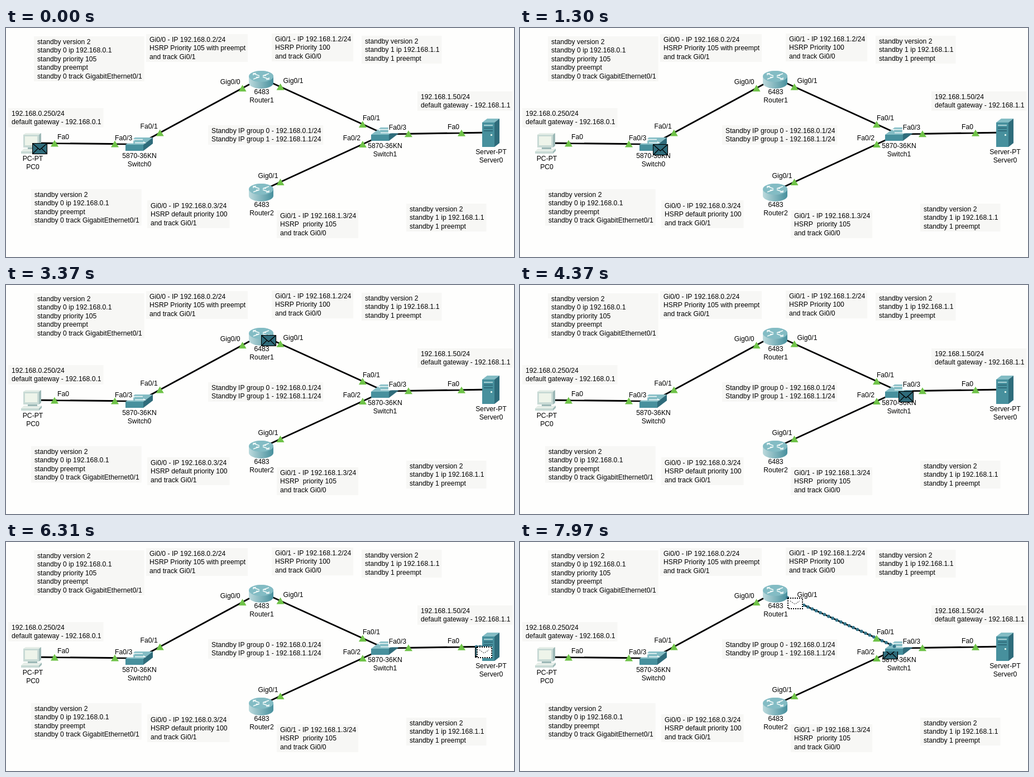
Write an HTML page with a canvas that moves like this. It is 910x412 px and loops after 8000 ms.

```html
<!DOCTYPE html>
<html lang="en">
<head>
<meta charset="utf-8">
<title>Packet simulation</title>
<style>
  html, body { margin: 0; width: 100%; height: 100%; overflow: hidden; background: #fefefd; }
  canvas { display: block; }
</style>
</head>
<body>
<canvas id="stage" width="910" height="412"></canvas>
<script>
const ctx = document.getElementById('stage').getContext('2d');
const LOOP = 8000, FIRST_HOP = 585, HOP_PERIOD = 1419, FLIGHT = 315, STEPS = 30;
const LINE_HEIGHT = 15.4;
const PAPER = '#fefefd', NOTE = '#f7f7f5', DARK = '#2f6c7b', TEAL = '#47909d', LIGHT = '#83bcc4';

// reach: distance from the centre to a link light; drop: distance down to the caption.
const kinds = {
  pc: { draw: drawPc, reach: 40, drop: 28, model: 'PC-PT' },
  switch: { draw: drawSwitch, reach: 43, drop: 21, model: '5870-36KN' },
  router: { draw: drawRouter, reach: 38, drop: 25, model: '6483' },
  server: { draw: drawServer, reach: 52, drop: 35, model: 'Server-PT' }
};
const device = (kind, name, x, y) => ({ ...kinds[kind], name, x, y });
const pc = device('pc', 'PC0', 47, 207);
const switch0 = device('switch', 'Switch0', 238, 209);
const router1 = device('router', 'Router1', 457, 90);
const router2 = device('router', 'Router2', 457, 293);
const switch1 = device('switch', 'Switch1', 678, 191);
const server = device('server', 'Server0', 868, 188);
const devices = [pc, switch0, router1, router2, switch1, server];
const route = [pc, switch0, router1, switch1, server, switch1, router1];

// Port names stand to the left or right of their link lights.
const links = [
  { from: pc, to: switch0, ports: ['Fa0', 'Fa0/3'], side: 'right' },
  { from: switch0, to: router1, ports: ['Fa0/1', 'Gig0/0'], side: 'left' },
  { from: router1, to: switch1, ports: ['Gig0/1', 'Fa0/1'], side: 'right' },
  { from: switch1, to: server, ports: ['Fa0/3', 'Fa0'], side: 'left' },
  { from: router2, to: switch1, ports: ['Gig0/1', 'Fa0/2'], side: 'left' }
];

const standby = (group, ...rest) =>
  ['version 2', `${group} ip 192.168.${group}.1`, ...rest].map(line => 'standby ' + line);
const port = (net, host, priority) =>
  [`Gi0/${net} - IP 192.168.${net}.${host}/24`, 'HSRP ' + priority, `and track Gi0/${1 - net}`];
const host = (net, number) =>
  [`192.168.${net}.${number}/24`, `default gateway - 192.168.${net}.1`];
const trackPort = '0 track GigabitEthernet0/1';
const notes = [
  [56, 25, standby(0, 'priority 105', 'preempt', trackPort)],
  [257, 21, port(0, 2, 'Priority 105 with preempt')],
  [482, 20, port(1, 2, 'Priority 100')],
  [643, 24, standby(1, '1 preempt')],
  [10, 154, host(0, 250)],
  [743, 124, host(1, 50)],
  [368, 185, [0, 1].map(group => `Standby IP group ${group} - 192.168.${group}.1/24`)],
  [51, 300, standby(0, 'preempt', trackPort)],
  [259, 320, port(0, 3, 'default priority 100')],
  [491, 338, port(1, 3, ' priority 105')],
  [723, 326, standby(1, '1 preempt')]
];

const along = (a, b, share) => [a.x + (b.x - a.x) * share, a.y + (b.y - a.y) * share];

function rect(fill, x, y, w, h) {
  ctx.fillStyle = fill;
  ctx.fillRect(x, y, w, h);
}

function poly(fill, ...points) {
  ctx.beginPath();
  points.forEach(([x, y]) => ctx.lineTo(x, y));
  ctx.fillStyle = fill;
  ctx.fill();
}

function stroke(color, width, ...points) {
  ctx.beginPath();
  points.forEach(([x, y]) => ctx.lineTo(x, y));
  ctx.strokeStyle = color;
  ctx.lineWidth = width;
  ctx.stroke();
}

function text(string, x, y, align = 'left') {
  ctx.textAlign = align;
  ctx.fillStyle = '#000';
  ctx.fillText(string, x, Math.round(y) + 4);
}

// A box seen from the front, with its top and right faces leaning back.
function box(x, y, w, h, leanX, leanY, [front, top, side]) {
  const right = x + w;
  poly(top, [x, y], [x + leanX, y - leanY], [right + leanX, y - leanY], [right, y]);
  poly(side, [right, y], [right + leanX, y - leanY], [right + leanX, y + h - leanY], [right, y + h]);
  rect(front, x, y, w, h);
}

function drawPc() {
  const shades = ['#c8dad5', '#e6eee8', '#9cb8b6'];
  box(-20, 15, 32, 4, 5, 5, shades);
  rect(shades[2], -8, 8, 17, 3);
  box(-16, -15, 28, 23, 4, 3, shades);
  rect('#eef4ea', -13, -12, 22, 16);
}

function drawSwitch() {
  box(-24, 1, 32, 11, 17, 13, [TEAL, LIGHT, DARK]);
  for (const s of [-1, 1]) {
    stroke('#f4fbfa', 1.4, [-7 * s, -5.5 + 3 * s], [11 * s, -5.5 + 3 * s], [8 * s, -5.5 + s]);
  }
}

function drawRouter() {
  const top = -3, bottom = 9;
  const shade = ctx.createLinearGradient(-22, 0, 22, 0);
  shade.addColorStop(0, '#bcdadd');
  shade.addColorStop(1, TEAL);
  ctx.beginPath();
  ctx.ellipse(0, bottom, 22, 10, 0, 0, Math.PI);
  ctx.ellipse(0, top, 22, 10, 0, Math.PI, 2 * Math.PI);
  ctx.fillStyle = shade;
  ctx.fill();
  ctx.beginPath();
  ctx.ellipse(0, top, 22, 10, 0, 0, 2 * Math.PI);
  ctx.fillStyle = LIGHT;
  ctx.fill();
  for (const sx of [-1, 1]) for (const sy of [-1, 1]) {
    const tip = sx * sy > 0 ? 14 : 4;
    stroke('#f4fbfa', 1.7, [sx * 3, top + sy], [sx * 14, top + sy * 5]);
    stroke('#f4fbfa', 1.5, [sx * 9, top + sy * tip * .4], [sx * tip, top + sy * tip * .36], [sx * tip, top + sy * 2]);
  }
}

function drawServer() {
  box(-15, -18, 22, 44, 9, 7, [TEAL, LIGHT, DARK]);
  for (let slot = 0; slot < 3; slot++) rect(slot ? DARK : '#a9d2d6', -12, -14 + 5 * slot, 16, 2);
  rect('#d8eee6', 0, 3, 3, 3);
}

function drawNote([x, y, lines]) {
  const width = Math.max(...lines.map(line => ctx.measureText(line).width));
  rect(NOTE, x - 6, y - 10, width + 10, lines.length * LINE_HEIGHT + 4);
  lines.forEach((line, i) => text(line, x, y + i * LINE_HEIGHT));
}

function drawDevice({ x, y, draw }) {
  ctx.save();
  ctx.translate(x, y);
  draw();
  ctx.restore();
}

function drawCaption({ x, y, drop, model, name }) {
  text(model, x + 1, y + drop, 'center');
  text(name, x + 1, y + drop + 15, 'center');
}

function drawPorts({ from, to, ports, side }) {
  const length = Math.hypot(to.x - from.x, to.y - from.y);
  const lights = [along(from, to, from.reach / length), along(to, from, to.reach / length)];
  lights.forEach(([x, y], end) => {
    const width = ctx.measureText(ports[end]).width;
    const left = side === 'left' ? x - 4 - width : x + 5 - 5 * end;
    rect(PAPER, left - 1, y - 20, width + 3, 19);
    text(ports[end], left, y - 11);
  });
  lights.forEach(([x, y]) => poly('#6fc348', [x, y - 6], [x + 7, y + 6], [x - 7, y + 6]));
}

function drawTrail(from, to, step) {
  ctx.fillStyle = '#337489';
  for (let i = 1; i <= step; i++) {
    ctx.beginPath();
    ctx.arc(...along(from, to, i / STEPS), 2.9, 0, 2 * Math.PI);
    ctx.fill();
  }
}

// cut hides the upper rows of an envelope that is on its way out.
function drawSolidEnvelope(x, y, cut = 0) {
  ctx.save();
  ctx.beginPath();
  ctx.rect(x, y + cut, 28, 21 - cut);
  ctx.clip();
  ctx.translate(x, y);
  rect(DARK, 0, 0, 27, 20);
  stroke('#000', 1.4, [1, 1], [13.5, 12], [26, 1]);
  for (const s of [-1, 1]) stroke('#000', 1.2, [13.5 + 12.5 * s, 19], [13.5 + 3.5 * s, 10]);
  ctx.strokeRect(.5, .5, 26, 19);
  ctx.restore();
}

function drawDottedEnvelope(x, y) {
  ctx.save();
  ctx.translate(Math.round(x), Math.round(y));
  rect('#fff', 0, 0, 28, 21);
  ctx.setLineDash([2, 2]);
  ctx.lineWidth = 2;
  ctx.strokeStyle = '#000';
  ctx.strokeRect(1, 1, 26, 19);
  stroke('#000', 1, [5, 6], [13.5, 12], [22, 6]);
  ctx.restore();
}

function draw(time) {
  const hop = Math.floor((time - FIRST_HOP) / HOP_PERIOD);
  const progress = (time - FIRST_HOP - hop * HOP_PERIOD) / FLIGHT;
  const flying = hop >= 0 && progress < 1;
  const from = route[Math.max(hop, 0)], to = route[hop + 1];
  const step = Math.floor(progress * STEPS);

  ctx.font = '12.2px "Liberation Sans", Arial, sans-serif';
  rect(PAPER, 0, 0, 910, 412);
  notes.forEach(drawNote);
  links.forEach(link => stroke('#000', 2.8, [link.from.x, link.from.y], [link.to.x, link.to.y]));
  devices.forEach(drawDevice);
  if (flying) drawTrail(from, to, step);
  devices.forEach(drawCaption);
  links.forEach(drawPorts);

  if (flying) {
    drawSolidEnvelope(from.x - 28, from.y, Math.min(6, progress * 9));
    drawDottedEnvelope(...along(from, to, step / STEPS));
  } else {
    drawSolidEnvelope(to.x, to.y);
  }
}

function tick() {
  draw(performance.now() % LOOP);
  requestAnimationFrame(tick);
}
tick();
</script>
</body>
</html>
```
